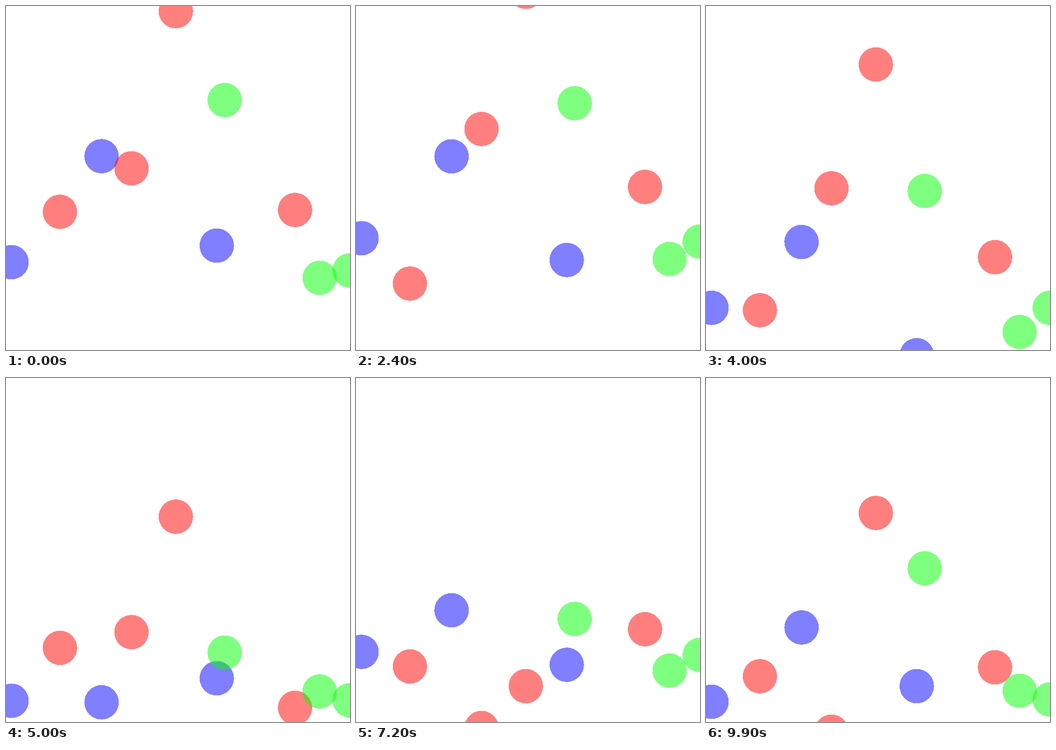
Write an HTML page that moves like this. It is 748 px wide and 748 px high and loops after 10 s.

```html
<!DOCTYPE html>
<html lang="en">
<head>
<meta charset="utf-8">
<title>Bouncing balls</title>
<style>
  html, body { margin: 0; width: 100%; height: 100%; overflow: hidden; background: #fff; }
  svg { display: block; width: 100vw; height: 100vh; }
  circle { fill-opacity: .5; shape-rendering: crispEdges; }
</style>
</head>
<body>
<svg id="stage" viewBox="0 0 748 748"></svg>
<script>
const SIZE = 748, RADIUS = SIZE / 20;
const STEP_MS = 100, STEPS = 100;
const GRAVITY = 0.5815, BOUNCE = 0.8;

// Start position and vertical speed in pixels per step, back to front
const balls = [
  { color: '#00f', x: 207.8, y: 326.6, v: -6.675 },
  { color: '#00f', x: 458.3, y: 521, v: -5.381 },
  { color: '#00f', x: 12.1, y: 557, v: -8.857 },
  { color: '#f00', x: 369.3, y: 11.25, v: -8.442 },
  { color: '#f00', x: 117.3, y: 447.5, v: -0.187 },
  { color: '#f00', x: 272.9, y: 353, v: -10.254 },
  { color: '#f00', x: 628.5, y: 443.5, v: -8.774 },
  { color: '#0f0', x: 475.6, y: 204.5, v: -6.397 },
  { color: '#0f0', x: 682, y: 591, v: -8.397 },
  { color: '#0f0', x: 747.4, y: 575, v: -9.304 }
];

// The centre may sink below the floor for one step before it turns back
function simulate({ y, v }) {
  const heights = [];
  for (let i = 0; i < STEPS; i++) {
    heights.push(y);
    y += v;
    if (y > SIZE) v *= -BOUNCE;
    v += GRAVITY;
  }
  return heights;
}

function addCircle({ x, color }) {
  const circle = document.createElementNS('http://www.w3.org/2000/svg', 'circle');
  circle.setAttribute('cx', x);
  circle.setAttribute('r', RADIUS);
  circle.setAttribute('fill', color);
  return document.getElementById('stage').appendChild(circle);
}

const actors = balls.map(ball => ({ circle: addCircle(ball), heights: simulate(ball) }));

function render(time) {
  const step = Math.floor(time / STEP_MS) % STEPS;
  for (const { circle, heights } of actors) circle.setAttribute('cy', heights[step].toFixed(2));
}

function tick() {
  render(performance.now());
  requestAnimationFrame(tick);
}
tick();
</script>
</body>
</html>
```
